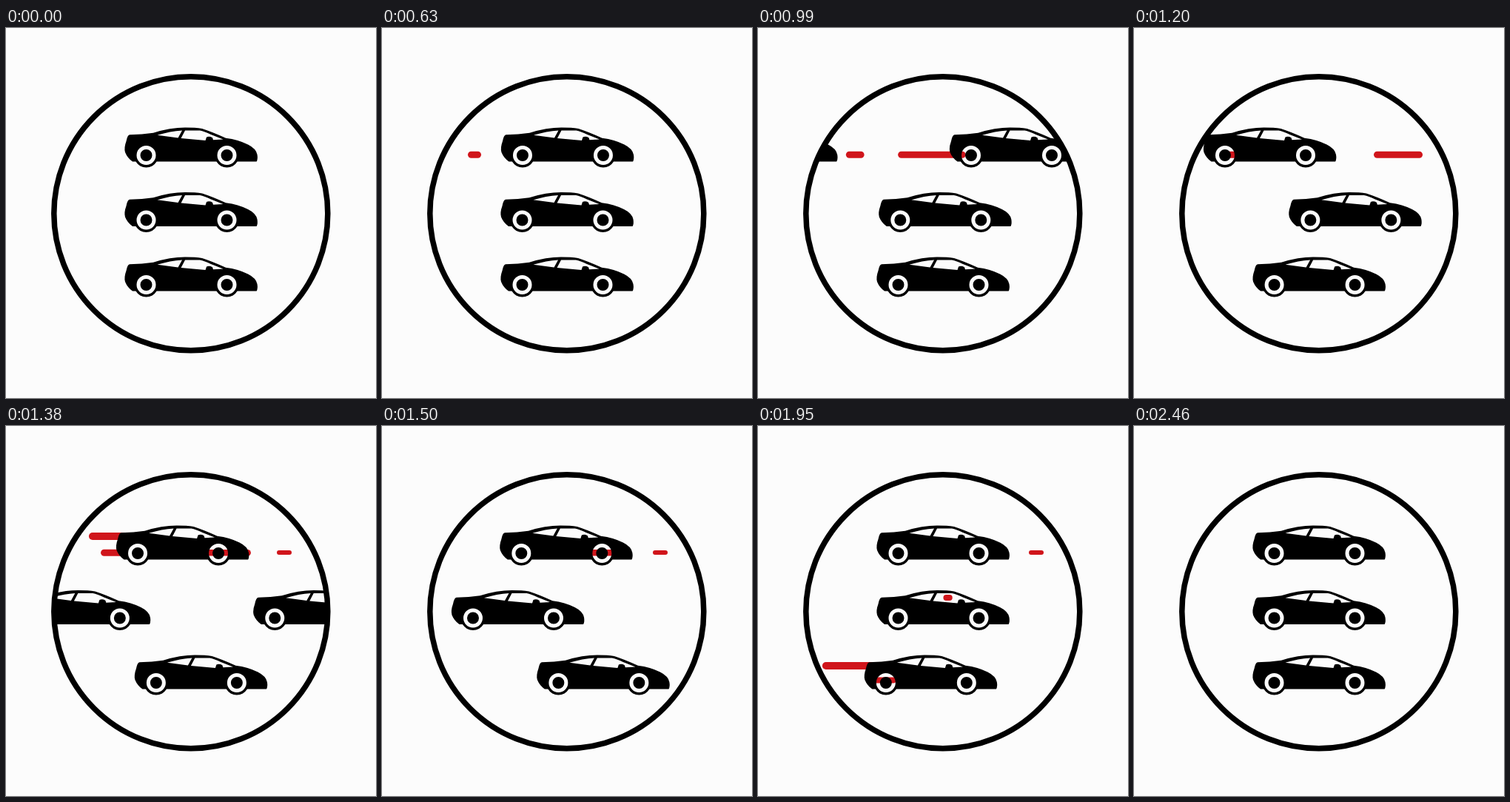
An HTML page with a canvas that plays this animation: 500 by 500 pixels, repeating every 2.7 s.

```html
<!DOCTYPE html>
<html lang="en">
<head>
<meta charset="utf-8">
<title>Racing cars</title>
<style>
  html, body { margin: 0; width: 100%; height: 100%; overflow: hidden; background: #fcfcfc; }
  canvas { display: block; width: 500px; height: 500px; }
</style>
</head>
<body>
<canvas id="stage" width="500" height="500"></canvas>
<script>
const ctx = document.getElementById('stage').getContext('2d');
const LOOP = 2700, STEP = 30;
const ROWS = 3, ROW_GAP = 87.5, ROW_DELAY = 300;
const PAPER = '#fcfcfc', INK = '#000', RED = '#d0151b';

// Body, windows and wheel rims; the even-odd rule leaves windows and rims open.
const car = new Path2D(
  'M167 144.3 Q184 144.2 199 141.8 Q222 134.6 242 134.6 Q256 134.6 265 136 ' +
  'Q279 140.5 297 148.8 Q314 151 327 157.5 Q338 163 339.5 171 Q340.6 177 338.6 180.6 ' +
  'L312.6 180.6 A16.5 16.5 0 0 1 284.4 180.6 L203.6 180.6 A16.5 16.5 0 0 1 175.4 180.6 ' +
  'L171 180.6 Q164 175.5 161 168 Q159.2 162 162.5 153 Q164 145 167 144.3 Z ' +
  'M204.5 144.8 Q222 139.6 238 138.5 L232.5 148.6 Z ' +
  'M242 138.5 L262 138.5 Q268 139.6 277 144 L293.5 150.4 L280 151.2 L279 148.2 ' +
  'Q275 146 271 147.4 L269.5 152 L236.5 149 Z'
);
for (const x of [189.5, 298.5]) {
  for (const r of [13, 8]) {
    car.moveTo(x + r, 172);
    car.arc(x, 172, r, 0, Math.PI * 2);
  }
}

const ring = new Path2D();
ring.arc(249.8, 250.8, 185, 0, Math.PI * 2);

const progress = (t, start, length) => Math.min(1, Math.max(0, (t - start) / length));
const easeIn = p => p ** 3;

function drawBar(left, right, y, h) {
  if (right - left < 0.5) return;
  ctx.beginPath();
  ctx.roundRect(left, y - h / 2, right - left, h, h / 2);
  ctx.fill();
}

// A line whose head runs ahead and whose tail catches up.
function sweep(t, y, h, from, to, head, tail) {
  const at = ([start, length]) => from + (to - from) * easeIn(progress(t, start, length));
  drawBar(at(tail), at(head), y, h);
}

// A short bar that drifts and grows or shrinks evenly while it lives.
function dash(t, y, h, { start, end, x, w, drift = 0, grow = 0 }) {
  if (t < start || t >= end) return;
  const p = progress(t, start, end - start);
  const mid = x + drift * p, half = (w + grow * p) / 2;
  drawBar(mid - half, mid + half, y, h);
}

function drawStreaks(t) {
  sweep(t, 171.2, 9, 114, 390, [280, 840], [476, 793]);
  dash(t, 171.2, 9, { start: 870, end: 1440, x: 127, w: 22, drift: 20, grow: 13 });
  dash(t, 171.2, 8.5, { start: 1230, end: 1890, x: 300, w: 80, grow: -80 });
  dash(t, 171, 6, { start: 1230, end: 2460, x: 376, w: 20 });

  [149, 249, 324].forEach((y, row) =>
    sweep(t - row * ROW_DELAY, y, 10, 82, 180, [1200, 105], [1314, 98]));
  [232, 343.5].forEach((y, i) =>
    dash(t - i * ROW_DELAY, y, 8, { start: 1560, end: 2040, x: 142, w: 44, drift: 141, grow: -39 }));
}

// One car accelerates out to the right, the next brakes in from the left.
const leaving = t => easeIn(Math.max(0, t - 558) * 0.01069);
const arriving = t => -easeIn(Math.max(0, 1606 - t) * 0.00998);

function drawCar(dx, dy) {
  if (Math.abs(dx) > 300) return;
  ctx.save();
  ctx.translate(dx, dy);
  ctx.fill(car, 'evenodd');
  ctx.restore();
}

function draw(t) {
  ctx.fillStyle = PAPER;
  ctx.fillRect(0, 0, 500, 500);

  ctx.save();
  ctx.clip(ring);
  ctx.fillStyle = RED;
  drawStreaks(t);
  ctx.fillStyle = INK;
  for (let row = 0; row < ROWS; row++) {
    const local = t - row * ROW_DELAY;
    drawCar(leaving(local), row * ROW_GAP);
    drawCar(arriving(local), row * ROW_GAP);
  }
  ctx.restore();

  ctx.lineWidth = 7.5;
  ctx.strokeStyle = INK;
  ctx.stroke(ring);
}

const start = performance.now();
function tick() {
  const t = (performance.now() - start) % LOOP;
  draw(Math.floor(t / STEP) * STEP);
  requestAnimationFrame(tick);
}
tick();
</script>
</body>
</html>
```
